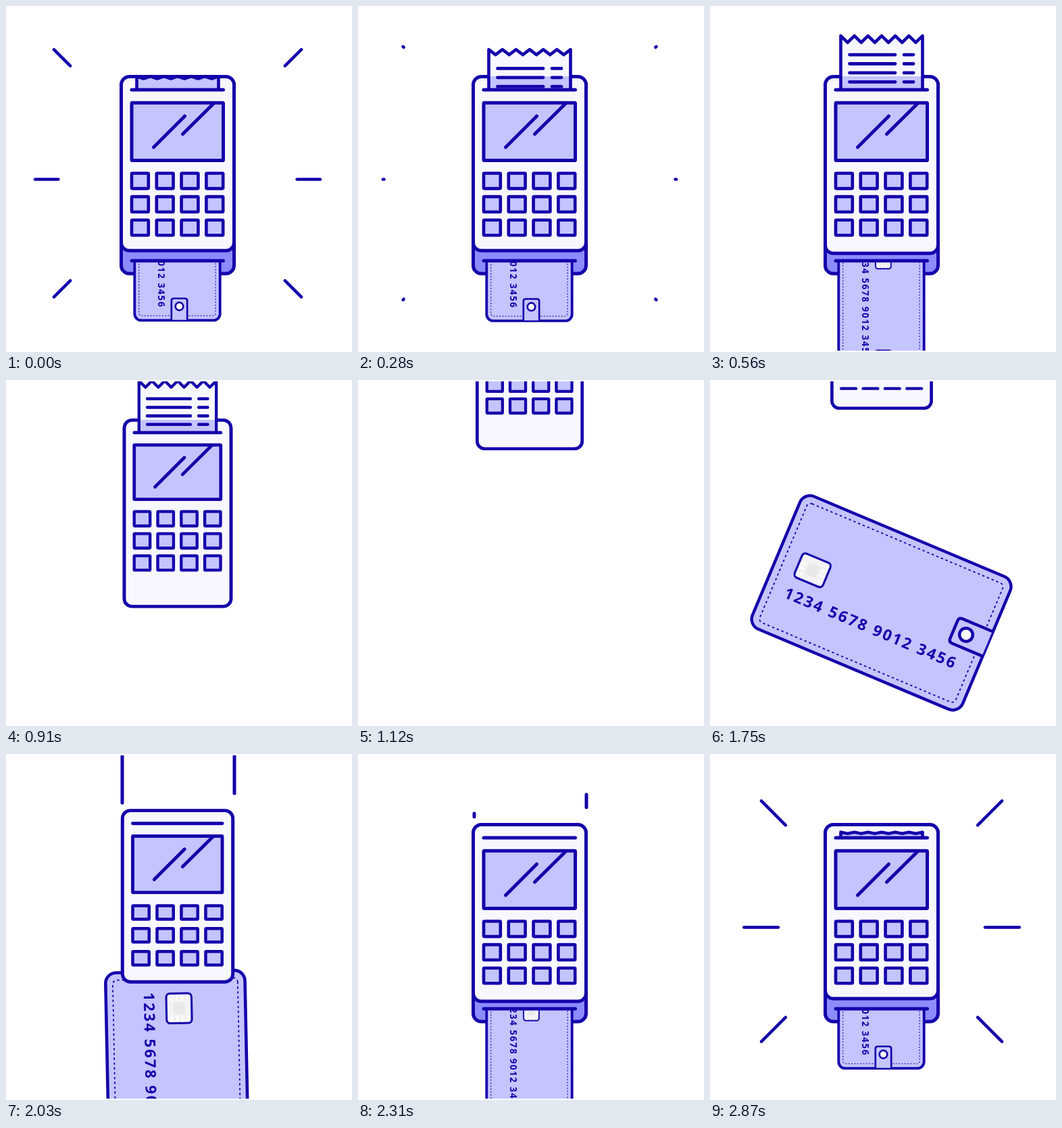
Write an HTML page with a canvas that moves like this. It is 512 by 512 pixels and loops after 2.94 s.

```html
<!DOCTYPE html>
<html lang="en">
<head>
<meta charset="utf-8">
<title>Card payment</title>
<style>
  html, body { margin: 0; width: 100%; height: 100%; overflow: hidden; background: #fff; }
  canvas { display: block; width: 100vw; height: 100vh; }
</style>
</head>
<body>
<canvas id="stage" width="512" height="512"></canvas>
<script>
const ctx = document.getElementById("stage").getContext("2d");
const LOOP = 2940, STEP = 70;
const INK = "#1400aa", LILAC = "#c4c4ff", PALE = "#f7f7ff", SHADE = "#8c8cff";
const CX = 254, SLOT = 124, CARD_SLOT = 377;

const clamp = v => Math.min(1, Math.max(0, v));
const mix = (a, b, p) => a + (b - a) * p;
const span = (t, from, length) => clamp((t - from) / length);
const sineOut = p => Math.sin(p * Math.PI / 2);
const sineInOut = p => (1 - Math.cos(p * Math.PI)) / 2;
const cubicOut = p => 1 - (1 - p) ** 3;
const powInOut = (p, n) => p < 0.5 ? (2 * p) ** n / 2 : 1 - (2 - 2 * p) ** n / 2;

function box(x, y, w, h, r, fill, lw) {
  ctx.beginPath();
  ctx.roundRect(x, y, w, h, r);
  if (fill) { ctx.fillStyle = fill; ctx.fill(); }
  if (lw) { ctx.lineWidth = lw; ctx.stroke(); }
}

function line(x1, y1, x2, y2, lw = 5) {
  ctx.lineWidth = lw;
  ctx.beginPath();
  ctx.moveTo(x1, y1);
  ctx.lineTo(x2, y2);
  ctx.stroke();
}

function clipRect(x, y, w, h) {
  ctx.beginPath();
  ctx.rect(x, y, w, h);
  ctx.clip();
}

function drawCard(t) {
  if (t < 1470 || t > 4000) return;
  const turn = powInOut(span(t, 1470, 680), 3.5);
  const shrink = sineInOut(span(t, 1960, 280));
  const scale = mix(1 + 0.045 * turn, 0.6, shrink);
  const leave = Math.max(0, (t - 3190) / 310);
  const y = 276 + 212 * turn - 123 * sineInOut(span(t, 2120, 490)) + 77 * leave ** 2;

  ctx.save();
  if (t >= 2100) clipRect(0, CARD_SLOT, 512, 200);
  ctx.translate(253.5, y);
  ctx.rotate(turn * Math.PI / 2);
  ctx.scale(scale, scale);
  ctx.translate(-253.5, -276);

  box(86.7, 170.7, 333.8, 210.6, 16, LILAC, 4.4 + 2 * shrink);
  ctx.setLineDash([3.4, 3.9]);
  ctx.lineCap = "butt";
  box(98, 181.7, 311, 188.8, 6, null, 1.8);
  ctx.setLineDash([]);
  ctx.lineCap = "round";

  // Chip
  box(119.8, 252, 45, 38.2, 5.5, "#f3f3f6", 3.1);
  ctx.fillStyle = "#fff";
  for (let i = 0; i < 4; i++) {
    ctx.fillRect(122, 257 + i * 8, 9, 2.5);
    ctx.fillRect(154, 257 + i * 8, 9, 2.5);
  }
  box(133.5, 262, 18, 18, 1, "#e9e9e9");

  // Clasp
  ctx.lineWidth = 4.4;
  ctx.fillStyle = LILAC;
  ctx.beginPath();
  ctx.moveTo(419.5, 251.5);
  ctx.lineTo(372, 251.5);
  ctx.quadraticCurveTo(366.5, 251.5, 366.5, 257);
  ctx.lineTo(366.5, 285);
  ctx.quadraticCurveTo(366.5, 290.5, 372, 290.5);
  ctx.lineTo(419.5, 290.5);
  ctx.fill();
  ctx.stroke();
  ctx.beginPath();
  ctx.arc(386, 271, 9.7, 0, 7);
  ctx.fillStyle = "#fff";
  ctx.fill();
  ctx.stroke();

  ctx.fillStyle = INK;
  ctx.font = "700 22.5px 'Open Sans', 'Noto Sans', sans-serif";
  ctx.letterSpacing = "2.6px";
  ctx.fillText("1234 5678 9012 3456", 117.5, 324);
  ctx.restore();
}

function drawReceipt(t) {
  const height = 81 * sineOut(span(t, 2820, 760));
  if (height <= 0) return;
  const left = 193.5, right = 314.5, top = SLOT - height;
  const tooth = (right - left) / 12, depth = 1.2 + 8.8 * height / 81;

  ctx.save();
  clipRect(180, -40, 150, SLOT + 40);
  ctx.beginPath();
  ctx.moveTo(left, SLOT);
  for (let i = 0; i <= 12; i++) ctx.lineTo(left + i * tooth, top + (i % 2) * depth);
  ctx.lineTo(right, SLOT);
  ctx.fillStyle = PALE;
  ctx.fill();
  ctx.save();
  ctx.clip();
  ctx.fillStyle = LILAC;
  ctx.fillRect(left, 104, right - left, 20);
  ctx.restore();
  ctx.lineWidth = 4.6;
  ctx.stroke();
  for (let i = 0; i < 4; i++) {
    const y = top + 28 + i * 13.4;
    line(206.5, y, 274, y, 4.8);
    line(287, y, 301, y, 4.8);
  }
  ctx.restore();
}

// Vertical centre, scale, lower edges and key height of the terminal
function terminalPose(t) {
  const drop = Math.max(0, (2240 - t) / 490);
  const rise = Math.max(0, t - 3570);
  return {
    y: 250 - 306 * drop ** 3 - 53 * (rise / 280) ** 3,
    scale: 1 - 0.12 * drop ** 2 - 0.07 * sineOut(clamp(rise / 490)),
    front: 366 - 5 * clamp(drop) - 4 * sineInOut(span(t, 2380, 210))
      + 4 * sineInOut(span(t, 3290, 210)) + 30 * sineInOut(span(t, 3560, 220)),
    back: 396 - 35 * clamp(drop),
    keys: 22.6 * sineInOut(span(t, 1750, 350))
  };
}

function inTerminal(pose, draw) {
  ctx.save();
  ctx.translate(CX, pose.y);
  ctx.scale(pose.scale, pose.scale);
  ctx.translate(-CX, -250);
  draw();
  ctx.restore();
}

function drawFront(t, pose) {
  const slotY = pose.back - 396 + CARD_SLOT;
  line(186, slotY, 321.5, slotY);
  box(170.5, 104.5, 167, pose.front - 104.5, 12, PALE, 5);
  box(186, 143.3, 135.5, 85.2, 1, LILAC, 5);
  line(218.5, 209, 264.5, 163);
  line(261.5, 189.5, 307, 144.5);
  for (let i = 0; i < 12; i++) {
    const x = 186 + i % 4 * 36.8, y = 258.8 + Math.floor(i / 4) * 34.6;
    if (pose.keys < 0.5) line(x, y, x + 24.8, y);
    else box(x, y - pose.keys / 2, 24.8, pose.keys, 1, LILAC, 4.6);
  }
  drawReceipt(t);
  line(186, SLOT, 321.5, SLOT);
}

function drawStreaks(t, pose) {
  if (t < 1960 || t > 2400) return;
  const top = pose.y - 146 * pose.scale;
  for (const [x, gap, rest] of [[172, 11, 5], [338, 25, 19]]) {
    const length = rest + (2310 - t) * 0.4;
    if (length > 0) line(x, top - gap, x, top - gap - length);
  }
}

function drawRays(t) {
  const outer = 95 + 122 * cubicOut(span(t, 2535, 640));
  const inner = 95 + 122 * cubicOut(span(t, 2752, 610));
  if (outer - inner < 0.5) return;
  for (const side of [-1, 1]) {
    line(CX + side * inner, 256.5, CX + side * outer, 256.5, 4.6);
    for (const up of [-1, 1]) {
      const a = (inner + 48) * Math.SQRT1_2, b = (outer + 48) * Math.SQRT1_2;
      line(CX + side * a, 247.5 + up * a, CX + side * b, 247.5 + up * b, 4.6);
    }
  }
}

function render(time) {
  // Time runs past the loop end so that motions across the seam stay whole
  const t = time < 1200 ? time + LOOP : time;
  const pose = terminalPose(t);
  ctx.fillStyle = "#fff";
  ctx.fillRect(0, 0, 512, 512);
  ctx.save();
  clipRect(0, 2, 512, 508);
  ctx.strokeStyle = INK;
  ctx.lineCap = ctx.lineJoin = "round";
  drawRays(t);
  inTerminal(pose, () => box(170.5, 106, 167, pose.back - 106, 12, SHADE, 5));
  drawCard(t);
  inTerminal(pose, () => drawFront(t, pose));
  drawStreaks(t, pose);
  ctx.restore();
}

const start = performance.now();
function tick() {
  const time = (performance.now() - start) % LOOP;
  render(Math.floor(time / STEP) * STEP);
  requestAnimationFrame(tick);
}
tick();
</script>
</body>
</html>
```
